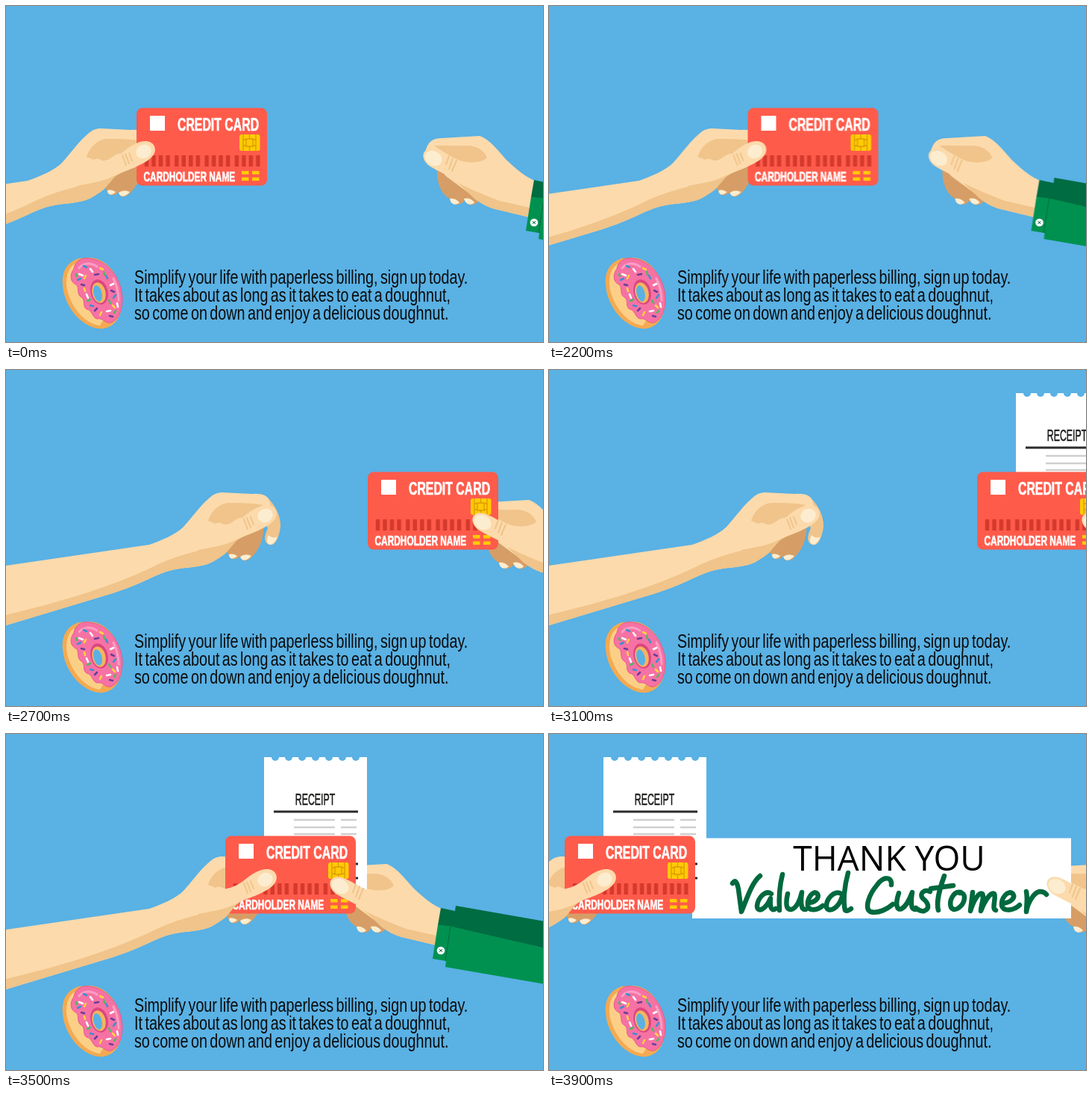
Write an HTML page that moves like this. It is 720x450 px and loops after 4 s.

```html
<!DOCTYPE html>
<html lang="en">
<head>
<meta charset="utf-8">
<title>Paperless billing</title>
<style>
  html, body { margin: 0; width: 720px; height: 450px; overflow: hidden; background: #59b1e4; }
  svg { display: block; }

  .left, .right, .card, .receipt, .unroll { animation: 4s -2ms infinite step-end; }
  .left { animation-name: left; }
  .right { animation-name: right; }
  .card { animation-name: card; }
  .receipt { animation-name: receipt; }
  .unroll { animation-name: unroll; }

  @keyframes left {
    0% { transform: translateX(-163px); }
    50% { transform: translateX(-143px); animation-timing-function: steps(4); }
    60% { transform: translateX(0); }
    90% { transform: translateX(-20px); animation-timing-function: steps(3); }
    97.5%, 100% { transform: translateX(-273px); }
  }
  @keyframes right {
    0% { transform: translateX(0); }
    50% { transform: translateX(-20px); animation-timing-function: steps(4); }
    60% { transform: translateX(-81px); }
    62.5% { transform: translateX(-27px); animation-timing-function: steps(2); }
    67.5% { transform: translateX(66px); animation-timing-function: steps(2); }
    72.5% { transform: translateX(225px); }
    77.5% { transform: translateX(155px); animation-timing-function: steps(4); }
    87.5% { transform: translateX(-125px); }
    90% { transform: translateX(-105px); animation-timing-function: steps(3); }
    97.5%, 100% { transform: translateX(108px); }
  }
  @keyframes card {
    0% { transform: translateX(0); }
    50% { transform: translateX(20px); animation-timing-function: steps(4); }
    60% { transform: translateX(163px); }
    62.5% { transform: translateX(217px); animation-timing-function: steps(2); }
    67.5% { transform: translateX(310px); animation-timing-function: steps(2); }
    72.5% { transform: translateX(469px); }
    77.5% { transform: translateX(399px); animation-timing-function: steps(4); }
    87.5% { transform: translateX(119px); }
    90% { transform: translateX(99px); animation-timing-function: steps(3); }
    97.5%, 100% { transform: translateX(-154px); }
  }
  @keyframes receipt {
    0% { visibility: hidden; }
    72.5%, 100% { visibility: visible; }
  }
  @keyframes unroll {
    0% { transform: translateX(-508px); }
    90% { transform: translateX(-466px); animation-timing-function: steps(3); }
    97.5%, 100% { transform: translateX(0); }
  }

  text { font-family: "Liberation Sans", Arial, sans-serif; }
  .copy { font-size: 25px; word-spacing: -2.6px; fill: #0b0b0b; }
  .bold { font-weight: bold; fill: #fff; stroke: #fff; stroke-width: .7px; }
  .thanks { font: 46px "Open Sans", "Noto Sans", sans-serif; }
  .skin { fill: #fcdaac; }
  .shade { fill: #f0c48a; }
  .deep { fill: #d69e66; }
  .nail { fill: #fdedd0; }
  .crease { fill: none; stroke: #f0c48a; stroke-width: 2; stroke-linecap: round; }
  .dark { fill: #006c41; }
  .green { fill: #009150; }
  .yellow { fill: #ffcb05; }
  .script { fill: none; stroke: #00693e; stroke-width: 6.5; stroke-linecap: round; stroke-linejoin: round; }
  .sprinkles path { fill: none; stroke-width: 2.6; stroke-linecap: round; }
</style>
</head>
<body>
<svg width="720" height="450" viewBox="0 0 720 450">
  <defs>
    <clipPath id="reveal"><rect class="unroll" x="192" y="130" width="508" height="130"/></clipPath>
    <pattern id="digits" x="185" y="200" width="40.3" height="15" patternUnits="userSpaceOnUse">
      <path d="M3.5 0v15M13 0v15M22.5 0v15M32 0v15" stroke="#d4392c" stroke-width="5.5"/>
    </pattern>
  </defs>
  <rect width="720" height="450" fill="#59b1e4"/>

  <!-- doughnut -->
  <g>
    <path fill="#f3aa52" d="M98 338C83 342 74 355 76 374C78 402 100 429 124 432C147 434 157 412 156 392C155 366 138 338 112 337Z"/>
    <path fill="#fbcf86" d="M91 346C80 354 79 373 84 387C91 408 108 426 126 428L140 405L105 350Z"/>
    <path fill="#f672a4" stroke="#e6588f" d="M111 338C101 336 92 343 91 352C85 360 86 370 94 373C99 377 94 386 101 390C107 393 102 402 108 406C116 407 115 417 122 419C130 417 133 426 141 424C151 420 156 407 156 391C155 366 137 340 111 338Z"/>
    <path fill="none" stroke="#fb9fc3" stroke-width="3" stroke-linecap="round" d="M98 351C104 343 114 344 122 349M144 365Q151 380 151 394"/>
    <ellipse cx="125" cy="383" rx="11.5" ry="17" fill="#dc4680" transform="rotate(-14 125 383)"/>
    <ellipse cx="124.500" cy="384" rx="9" ry="14" fill="#f5b460" transform="rotate(-14 124.500 384)"/>
    <ellipse cx="123" cy="385" rx="5.500" ry="11" fill="#59b1e4" transform="rotate(-14 123 385)"/>
    <g class="sprinkles">
      <path stroke="#fff" d="M98 359l5 2M113 352l3 4M140 374l4-2M108 386l2 5M135 409l5-1M149 398l1 5"/>
      <path stroke="#3d8fd0" d="M104 348l4 2M96 367l4-2M134 361l2 4M113 401l4 1M147 387l-3 4"/>
      <path stroke="#ffd23e" d="M107 361l-2 4M126 351l4 2M105 378l1 4M128 410l-2 4M143 401l3 3"/>
      <path stroke="#684096" d="M119 360l5-1M101 373l4 1M141 381l4 2M119 408l3-3M139 415l4 1"/>
      <path stroke="#54b666" d="M94 359l1 3M131 356l1 4M109 395l4-2M138 394l2 4M145 411l2-3"/>
    </g>
  </g>

  <g transform="translate(172 372) scale(.79 1)">
    <text class="copy">Simplify your life with paperless billing, sign up today.</text>
    <text class="copy" y="24">It takes about as long as it takes to eat a doughnut,</text>
    <text class="copy" y="48">so come on down and enjoy a delicious doughnut.</text>
  </g>

  <!-- arm and fingers behind the card, left -->
  <g class="left">
    <path class="deep" d="M284 232L345 203C347 222 341 240 329 251C322 258 315 256 314 249C308 256 299 254 298 246Z"/>
    <path class="nail" d="M299 247C299 254 306 254 310 249Q304 245 299 247ZM314 250C316 257 323 256 329 249Q321 245 314 250Z"/>
    <path class="shade" d="M348 169C360 178 369 196 368 210C366 226 360 236 354 234C345 232 346 222 351 212L340 190Z"/>
    <path class="nail" d="M352 221C347 230 352 236 357 233Q362 229 364 223Q358 227 352 221Z"/>
    <path class="skin" d="M-10 264L0 262L192 234C207 229 228 220 238 210C249 198 261 181 272 172C278 166 284 164 290 164L330 166C346 165 352 169 354 178L357 192L338 215C325 221 313 224 307 230C297 241 287 254 270 260C250 266 240 263 215 270C195 277 180 286 163 292L143 299L0 342L-10 345Z"/>
    <path class="shade" d="M-10 331L0 328C80 309 140 290 192 266C225 249 258 241 290 235L307 230C297 241 287 254 270 260C250 266 240 263 215 270C195 277 180 286 163 292L143 299L0 342L-10 345Z"/>
    <path class="shade" d="M271 202C275 188 288 177 301 178C316 178 332 178 345 181L318 199C311 194 304 207 295 207C289 207 287 202 281 206Z"/>
  </g>

  <!-- hand and sleeve behind the card, right -->
  <g class="right">
    <path class="deep" d="M578 216L645 245L632 263C626 269 617 266 615 260C608 270 598 266 595 258C583 252 577 236 578 216Z"/>
    <path class="nail" d="M595 258C596 266 603 268 608 263Q602 257 595 258ZM614 258C616 266 624 268 628 263Q622 256 614 258Z"/>
    <path class="skin" d="M562 196C565 182 572 177 584 177L635 174C650 179 661 196 673 208C687 221 698 230 712 235L702 283L660 273C645 270 638 263 628 256L590 228Z"/>
    <path class="shade" d="M605 236C625 247 643 253 662 261L706 271L702 283L660 273C645 270 636 264 628 258Z"/>
    <path class="shade" d="M574 187C590 186 604 188 615 187C630 186 641 193 645 203C638 211 618 211 606 206Q588 197 574 187Z"/>
    <path class="dark" d="M708 233L727 237L728 230L865 254V291L719 258L704 256Z"/>
    <path class="green" d="M704 256L719 257L865 291V338L714 312L715 304L697 301Z"/>
    <path fill="none" stroke="#006c41" d="M724 238L714 304"/>
    <circle cx="708" cy="290" r="5.300" fill="#fff"/>
    <path stroke="#006c41" d="M706 288l4 4m0-4l-4 4"/>
  </g>

  <!-- banner -->
  <g class="card">
    <g transform="translate(154)">
      <g clip-path="url(#reveal)">
        <rect x="192" y="139.500" width="508" height="107.500" fill="#fff"/>
        <text class="thanks" x="456" y="183" text-anchor="middle">THANK YOU</text>
        <g class="script" role="img" aria-label="Valued Customer">
          <path d="M246 200C249 195 252 197 254 208L258 238C265 222 271 200 283 190M298 214C290 208 280 220 279 230C279 240 290 236 297 220C296 232 298 238 304 234M313 188C310 200 308 220 309 236M320 214C317 228 318 236 325 235C332 233 337 222 339 212C337 226 338 236 344 235M347 226C356 226 363 220 360 214C354 208 346 220 347 230C349 238 360 236 367 230M392 214C382 208 371 222 372 232C375 240 388 234 393 218M401 186C396 204 394 224 397 236Q400 238 405 234"/>
          <path d="M459 202C460 191 449 190 440 202C428 216 423 234 431 238C442 241 454 234 461 228M469 213C464 228 466 237 473 234C480 230 484 220 487 212C485 224 485 236 491 235M511 211C503 207 496 214 501 220C509 226 511 234 503 237Q498 238 492 233M530 190C524 206 519 226 522 236M512 207L542 203M552 212C542 210 536 224 539 232C544 240 556 230 557 220Q557 212 551 213M568 212L565 237C569 224 576 211 581 214C584 218 579 230 579 237C584 224 592 211 597 214C600 220 593 234 599 236M608 227C618 226 626 220 622 214C615 208 606 220 607 230C610 239 624 236 631 229M640 211C642 222 640 230 640 238C642 226 650 212 658 211Q664 211 667 215"/>
        </g>
      </g>
    </g>
  </g>

  <!-- receipt and card -->
  <g class="card">
    <g class="receipt" transform="translate(227 0)">
      <path fill="#fff" d="M0 31h10a5 5 0 0 0 10 0h8a5 5 0 0 0 10 0h8a5 5 0 0 0 10 0h8a5 5 0 0 0 10 0h8a5 5 0 0 0 10 0h8a5 5 0 0 0 10 0h8a5 5 0 0 0 10 0h10V225H0Z"/>
      <g transform="translate(68.500 95) scale(.56 1)">
        <text font-size="22" fill="#1d1d1b" stroke="#1d1d1b" stroke-width=".6" text-anchor="middle">RECEIPT</text>
      </g>
      <path stroke="#2b2b2b" stroke-width="3" d="M13 104h113M13 174h113M13 193h113"/>
      <path stroke="#cfcfcf" stroke-width="2.500" d="M40 115h55m8 0h21M40 125h55m8 0h21M40 134h55m8 0h21"/>
    </g>
    <rect x="175" y="136.500" width="175" height="104" rx="8" fill="#ff5b4b"/>
    <rect x="193" y="147" width="20" height="20" fill="#fff"/>
    <g transform="translate(230 166.500) scale(.66 1)"><text class="bold" font-size="24">CREDIT CARD</text></g>
    <g transform="translate(184.500 235) scale(.66 1)"><text class="bold" font-size="18">CARDHOLDER NAME</text></g>
    <rect x="185" y="200" width="156" height="15" fill="url(#digits)"/>
    <rect class="yellow" x="313" y="172" width="27.500" height="22" rx="3"/>
    <path fill="none" stroke="#dc9a00" stroke-width="1.300" d="M318 172v22M335 172v22M318 179h4m9 0h4M318 187h4m9 0h4M322 178h9v10h-9ZM326.500 172v6m0 10v6"/>
    <path class="yellow" d="M316 221h9.500v4.500h-9.500ZM330 221h9.500v4.500h-9.500ZM316 229.500h9.500v4.500h-9.500ZM330 229.500h9.500v4.500h-9.500Z"/>
  </g>

  <!-- thumbs in front -->
  <g class="left">
    <path class="skin" d="M268 207C284 212 305 207 318 197C330 187 340 181 350 181C361 181 366 191 361 199C356 207 346 211 338 215C327 220 317 222 311 227L300 234L258 241Z"/>
    <path class="shade" d="M258 241C280 237 298 234 313 225C305 232 300 240 294 246C285 253 275 258 262 262Z"/>
    <path class="crease" d="M319 200l5 13M323 198l5 13M328 197l4 10"/>
    <ellipse class="nail" cx="347.500" cy="195" rx="10.500" ry="9" transform="rotate(-25 347.500 195)"/>
  </g>
  <g class="right">
    <path class="skin" d="M560 204C557 194 566 189 575 192C588 196 596 204 608 208C624 212 640 210 646 203L672 225L665 262C645 255 626 246 611 239C602 232 590 226 580 221C570 216 562 212 560 204Z"/>
    <path class="crease" d="M594 201l-4 11M599 204l-5 14M604 207l-6 14"/>
    <ellipse class="nail" cx="573" cy="204" rx="12" ry="9.500" transform="rotate(30 573 204)"/>
  </g>
</svg>
</body>
</html>
```
